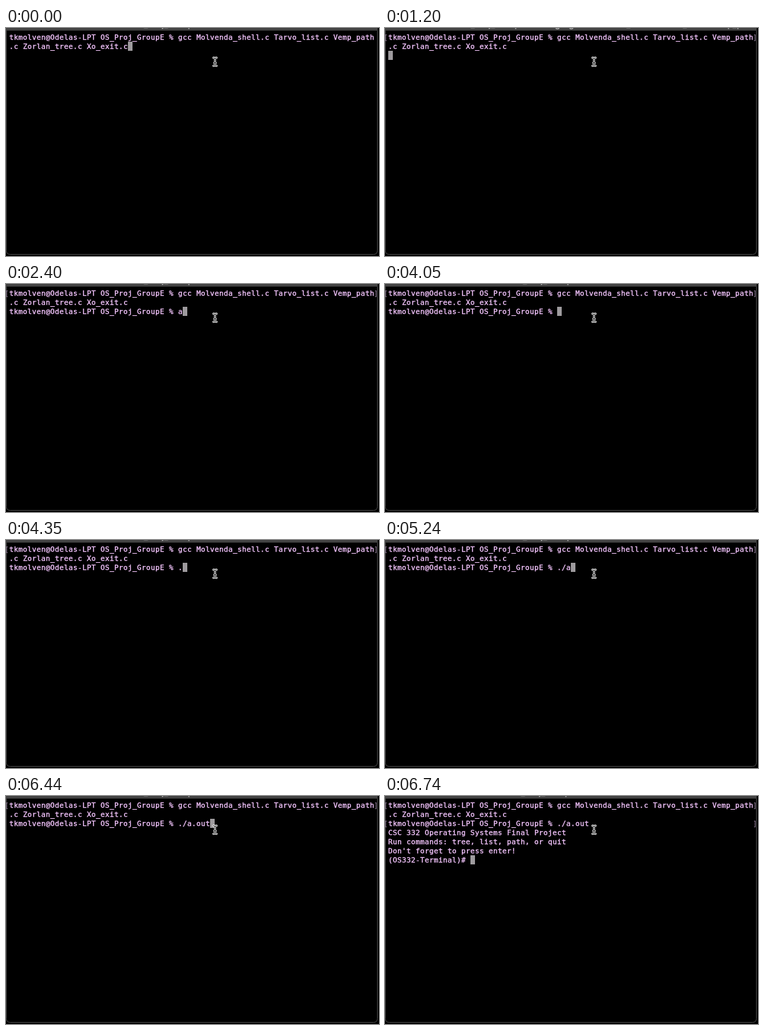
Recreate the animation shown at these times as an HTML page. Size 572 px wide and 350 px high, loop 8 s.

```html
<!DOCTYPE html>
<html lang="en">
<head>
<meta charset="utf-8">
<title>Terminal session</title>
<style>
  html, body { margin: 0; width: 100%; height: 100%; overflow: hidden; background: #000; }
  svg { display: block; width: 572px; height: 350px; }
  text { white-space: pre; }
  /* 11px glyphs on a 7px grid */
  .row, .mark { font: 11px "DejaVu Sans Mono", "Liberation Mono", monospace; letter-spacing: .3775px; }
  .row { fill: #f5c6ff; stroke: #f5c6ff; stroke-width: .35px; }
  .mark { fill: #98839f; }
  .title { font: 600 13px Inter, "Liberation Sans", sans-serif; fill: #b4b4b4; }
</style>
</head>
<body>
<svg viewBox="0 0 572 350">
  <defs>
    <path id="beam" d="M318 45.5Q320.5 45.5 320.5 47.5Q320.5 45.5 323 45.5M320.5 47.5V56M318 58Q320.5 58 320.5 56Q320.5 58 323 58M319.5 53.5H321.5"/>
  </defs>
  <rect width="572" height="350" fill="#000"/>
  <path d="M.5 3V341.5Q.5 347.5 6.5 347.5H563.5Q569.5 347.5 569.5 341.5V3" fill="none" stroke="#4c4c4c"/>
  <rect width="570" height="4" fill="#424242"/>
  <text id="title" class="title" y="-1.3"></text>
  <rect id="caret" width="7" height="14" fill="#9e9b9e"/>
  <g id="rows"></g>
  <g id="marks"></g>
  <g fill="none" stroke-linecap="round" stroke-linejoin="round">
    <use href="#beam" stroke="#fff" stroke-width="3"/>
    <use href="#beam" stroke="#000"/>
  </g>
</svg>
<script>
const LOOP = 8000, CELL = 7, LINE = 14, LEFT = 5, TOP = 7;
const NS = "http://www.w3.org/2000/svg";
const $ = id => document.getElementById(id);

const folder = "OS_Proj_GroupE";
const prompt = `tkmolven@Odelas-LPT ${folder} % `;
const command = [prompt + "gcc Molvenda_shell.c Tarvo_list.c Vemp_path", ".c Zorlan_tree.c Xo_exit.c"];
const output = [
  "CSC 332 Operating Systems Final Project",
  "Run commands: tree, list, path, or quit",
  "Don't forget to press enter!",
  "(OS332-Terminal)# "
];

const RETURN = 1200, DONE = 1800, RUN = 6740;
const typing = [
  [1800, ""], [2400, "a"], [4050, ""], [4350, "."], [5090, "./"],
  [5240, "./a"], [5990, "./a."], [6290, "./a.ou"], [6440, "./a.out"]
];
const titles = [
  [0, 193, "-zsh — 80×24"],
  [1200, 113, "clang ◂ gcc Molvenda_shell.c Tarvo_list.c Vemp_path.c"],
  [1500, 113, "ld ◂ gcc Molvenda_shell.c Tarvo_list.c Vemp_path.c"],
  [1800, 193, "-zsh — 80×24"],
  [6740, 190, "a.out — 80×24"]
];

const latest = (list, t) => list.filter(step => step[0] <= t).pop();

function addText(parent, cls, x, row, text) {
  const el = document.createElementNS(NS, "text");
  el.setAttribute("class", cls);
  el.setAttribute("x", x);
  el.setAttribute("y", TOP + row * LINE + 11);
  el.textContent = text;
  parent.append(el);
}

function linesAt(t) {
  if (t < RETURN) return command;
  if (t < DONE) return [...command, ""];
  const entry = prompt + latest(typing, t)[1];
  return t < RUN ? [...command, entry] : [...command, entry, ...output];
}

function markedRows(t) {
  return t < RETURN ? [] : t < RUN ? [0] : [0, 2];
}

let shown = "";

function draw(t) {
  const lines = linesAt(t);
  const [, titleX, process] = latest(titles, t);
  const key = lines.join("\n") + process;
  if (key === shown) return;
  shown = key;

  $("title").setAttribute("x", titleX);
  $("title").textContent = `${folder} — ${process}`;

  $("rows").replaceChildren();
  lines.forEach((line, row) => addText($("rows"), "row", LEFT, row, line));

  $("marks").replaceChildren();
  for (const row of markedRows(t)) {
    addText($("marks"), "mark", LEFT - CELL, row, "[");
    addText($("marks"), "mark", LEFT + 80 * CELL - 1, row, "]");
  }

  const last = lines.length - 1;
  $("caret").setAttribute("x", LEFT + lines[last].length * CELL);
  $("caret").setAttribute("y", TOP + last * LINE);
}

const start = performance.now();
function tick() {
  draw((performance.now() - start) % LOOP);
  requestAnimationFrame(tick);
}
tick();
</script>
</body>
</html>
```
